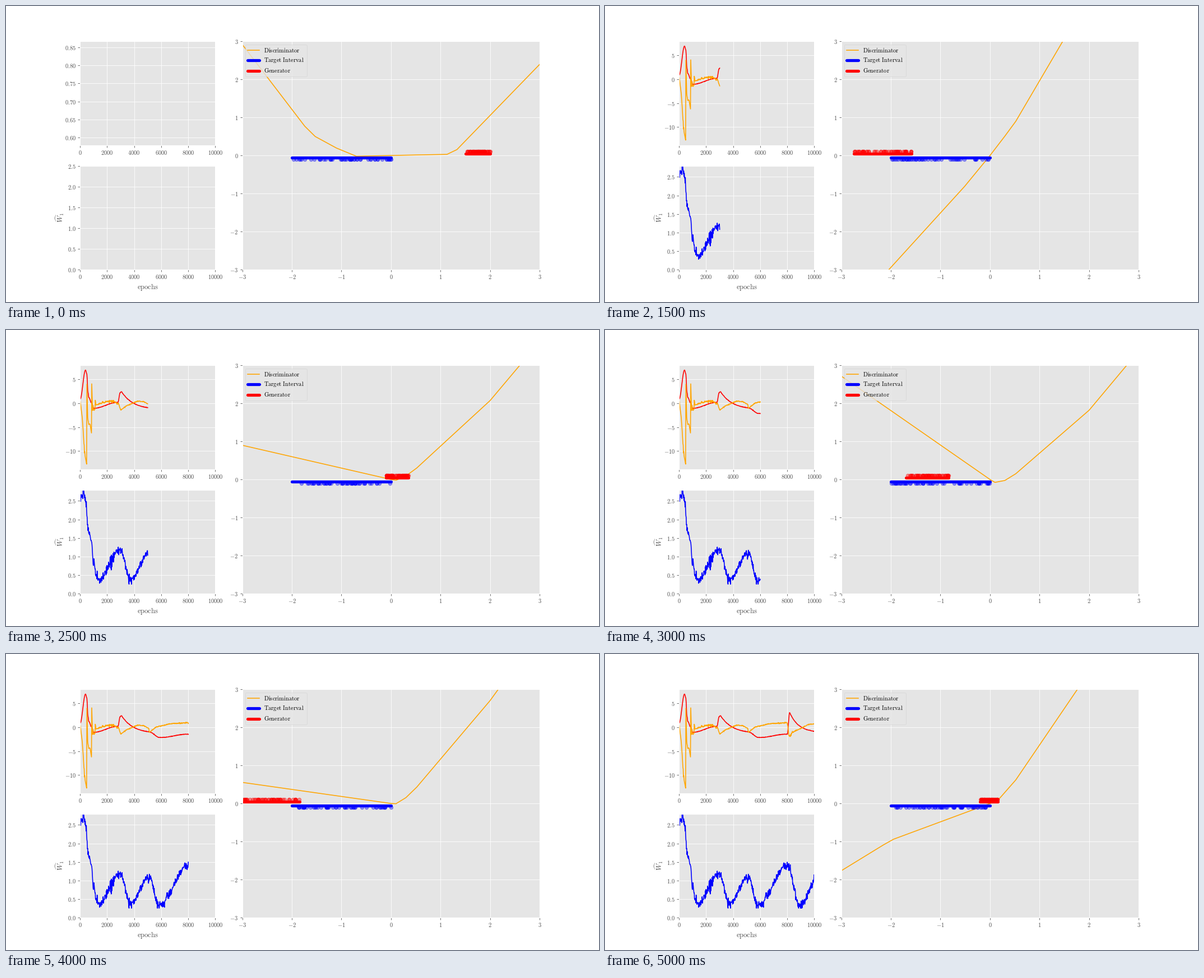
Recreate the animation shown at these times as a matplotlib script. Size 1058 by 529 pixels, loop 5500 ms.

```python
import numpy as np
import matplotlib.pyplot as plt
from matplotlib.animation import FuncAnimation

plt.style.use("ggplot")
plt.rcParams.update({"mathtext.fontset": "cm", "font.family": "Liberation Serif"})

STEP = 20
EPOCHS = np.arange(0, 10001, STEP)
N_DOTS = 50


def roman(text):
    return r"$\mathrm{" + text.replace(" ", r"\ ") + "}$"


def eased(knots):
    """Cosine easing from knot to knot."""
    x, y = np.array(knots).T
    pos = np.interp(EPOCHS, x, np.arange(len(x)))
    k = np.minimum(pos.astype(int), len(x) - 2)
    return y[k] + (y[k + 1] - y[k]) * (1 - np.cos(np.pi * (pos - k))) / 2


def jitter(seed):
    return np.random.default_rng(seed).normal(size=EPOCHS.size)


def bump(center, width):
    return np.exp(-((EPOCHS - center) / width) ** 2)


gen_loss = eased([(0, .85), (400, 6.95), (490, 6.2), (580, 2.3), (640, 1.2),
                  (860, 0), (1000, -1.05), (2800, .2), (2960, 2.2),
                  (3050, 2.45), (5100, -.97), (5900, -2.15), (8000, -1.45),
                  (8180, 3.1), (10000, -.9)])
for start, end, floor, tau in ((3060, 5100, -1.3, 850), (8180, 10000, -1.1, 650)):
    span = (EPOCHS >= start) & (EPOCHS <= end)
    peak = gen_loss[start // STEP]
    gen_loss[span] = floor + (peak - floor) * np.exp((start - EPOCHS[span]) / tau)
gen_loss += .03 * jitter(1) * (EPOCHS > 900)

disc_loss = np.interp(EPOCHS, *zip(
    (0, .6), (160, -3), (320, -10), (480, -12.85), (500, 4.1), (560, -3),
    (640, -4.4), (740, -4.4), (840, -6.2), (860, 4.1), (920, -1.5),
    (960, -.8), (1000, -1.4), (1100, -1.3), (1120, .7), (1180, -.4),
    (1700, .2), (2300, .4), (2850, -.1), (3000, -1.45), (3400, -.6),
    (4200, .4), (4700, .35), (5080, -.3), (5120, -1.1), (5600, 0),
    (6600, .7), (8000, 1), (8120, -1.6), (8200, -2), (8350, -1.1),
    (9600, .6), (10000, .7)))
disc_loss += jitter(4) * (.05 + .14 * bump(2200, 500) + .1 * bump(8250, 250)
                          + .2 * bump(350, 80) + .15 * bump(1000, 60))

distance = eased([(0, 2.58), (260, 2.7), (400, 2.5), (600, 1.75), (850, 1.4),
                  (980, .78), (1000, .93), (1180, .5), (1400, .37),
                  (2950, 1.17), (3750, .37), (5050, 1.1), (5850, .34),
                  (8000, 1.4), (8950, .32), (10200, 1.05)])
distance += jitter(9) * (.06 - .05 * bump(900, 150) + .04 * bump(2300, 200))
distance = np.clip(distance, .25, 2.79)


def valley(left, right, tail):
    """Corners of a hinge through the origin that turns up on the right."""
    kinks = np.array([-3, 0, .1, .3, .52, 2, 3])
    turn = left + (right - left) * np.array([0, .07, .57, .84, 1])
    slopes = np.append(turn, tail)
    y = np.cumsum(np.append(-3 * left, slopes * np.diff(kinks)))
    return list(zip(kinks, y))


# One entry per thousand epochs: generator interval, then discriminator corners
states = []


def add_state(lo, hi, *corners):
    states.append(((lo, hi), corners))


add_state(1.5, 2, (-3, 2.92), (-1.74, .77), (-1.53, .5), (-1.1, .195),
          (-.7, -.02), (0, 0), (1.13, .03), (1.33, .155), (3, 2.4))
add_state(-.41, -.115, (-1.4, 3.9), (-.515, .92), (-.126, .2), (0, 0),
          (.09, -.13), (.305, -.4), (1.5, -.425), (1.95, -.38),
          (2.14, -.325), (3, .09))
add_state(-2.05, -1.2, *valley(-.15, 1.85, 2.1))
add_state(-2.75, -1.584, (-3, -4.38), (-.51, -.81), (0, 0), (.3, .51),
          (.52, .9), (2, 4.19))
add_state(-.965, -.385, (-3, -2.12), (-2.75, -2.2), (-2.545, -2.185),
          (-.71, -.72), (0, 0), (.3, .325), (.506, .605), (1.5, 2.33),
          (2, 3.26))
add_state(-.1, .35, *valley(-.3, 1.2, 1.55))
add_state(-1.69, -.835, *valley(-.907, 1.13, 1.56))
add_state(-2.5, -1.35, *valley(-.44, 1.4, 1.65))
add_state(-3.05, -1.845, *valley(-.185, 1.54, 1.8))
add_state(-1.25, -.55, (-3, -3.4), (-.5, -.63), (0, 0), (.52, .78), (2, 3.74))
add_state(-.205, .16, (-3, -1.77), (-2.15, -1.09), (-1.945, -.94), (0, 0),
          (.19, .13), (.52, .62), (2, 3.46))

fig = plt.figure(figsize=(14, 7), dpi=1058 / 14)
ax_loss = plt.subplot2grid((2, 3), (0, 0))
ax_dist = plt.subplot2grid((2, 3), (1, 0))
ax_main = plt.subplot2grid((2, 3), (0, 1), rowspan=2, colspan=2)


def label_ticks(axis, values, spec="d"):
    axis.set_ticks(values, [f"${v:{spec}}$" for v in values])


for ax in (ax_loss, ax_dist):
    ax.set_xlim(0, 10000)
    label_ticks(ax.xaxis, range(0, 10001, 2000))
ax_dist.set_xlabel(roman("epochs"))
ax_dist.set_ylabel(r"$\widehat{W}_1$")
label_ticks(ax_dist.yaxis, np.arange(0, 2.6, .5), ".1f")
ax_main.set(xlim=(-3, 3), ylim=(-3, 3))
label_ticks(ax_main.xaxis, range(-3, 4))
label_ticks(ax_main.yaxis, range(-3, 4))

gen_line, = ax_loss.plot([], [], color="red")
disc_line, = ax_loss.plot([], [], color="orange")
dist_line, = ax_dist.plot([], [], color="blue")

wide = dict(lw=5, solid_capstyle="round")
dots = dict(ls="", marker="o", ms=6, alpha=.4)
curve, = ax_main.plot([], [], color="orange", label=roman("Discriminator"))
ax_main.plot([-2, 0], [-.05, -.05], color="blue",
             label=roman("Target Interval"), **wide)
gen_bar, = ax_main.plot([], [], color="red", label=roman("Generator"), **wide)
target_dots, = ax_main.plot([], [], color="blue", **dots)
gen_dots, = ax_main.plot([], [], color="red", **dots)
ax_main.legend(loc="upper left")


def update(i):
    n = 1000 * i // STEP + 1 if i else 0
    for line, values in ((gen_line, gen_loss), (disc_line, disc_loss),
                         (dist_line, distance)):
        line.set_data(EPOCHS[:n], values[:n])

    if i == 0:
        label_ticks(ax_loss.yaxis, np.arange(.6, .86, .05), ".2f")
        ax_loss.set_ylim(.579, .8663)
        ax_dist.set_ylim(0, 2.5)
    else:
        label_ticks(ax_loss.yaxis, range(-10, 6, 5))
        ax_loss.set_ylim(-13.8, 7.9)
        ax_dist.set_ylim(0, 2.8)

    (lo, hi), corners = states[i]
    rng = np.random.default_rng(100 + i)
    curve.set_data(*zip(*corners))
    gen_bar.set_data([lo, hi], [.05, .05])
    target_dots.set_data(rng.uniform(-2, 0, N_DOTS), np.full(N_DOTS, -.1))
    gen_dots.set_data(rng.uniform(lo, hi, N_DOTS), np.full(N_DOTS, .1))
    return curve, gen_bar, target_dots, gen_dots, gen_line, disc_line, dist_line


anim = FuncAnimation(fig, update, frames=len(states), interval=500,
                     init_func=lambda: update(0), repeat=True, repeat_delay=0)
plt.show()
```
